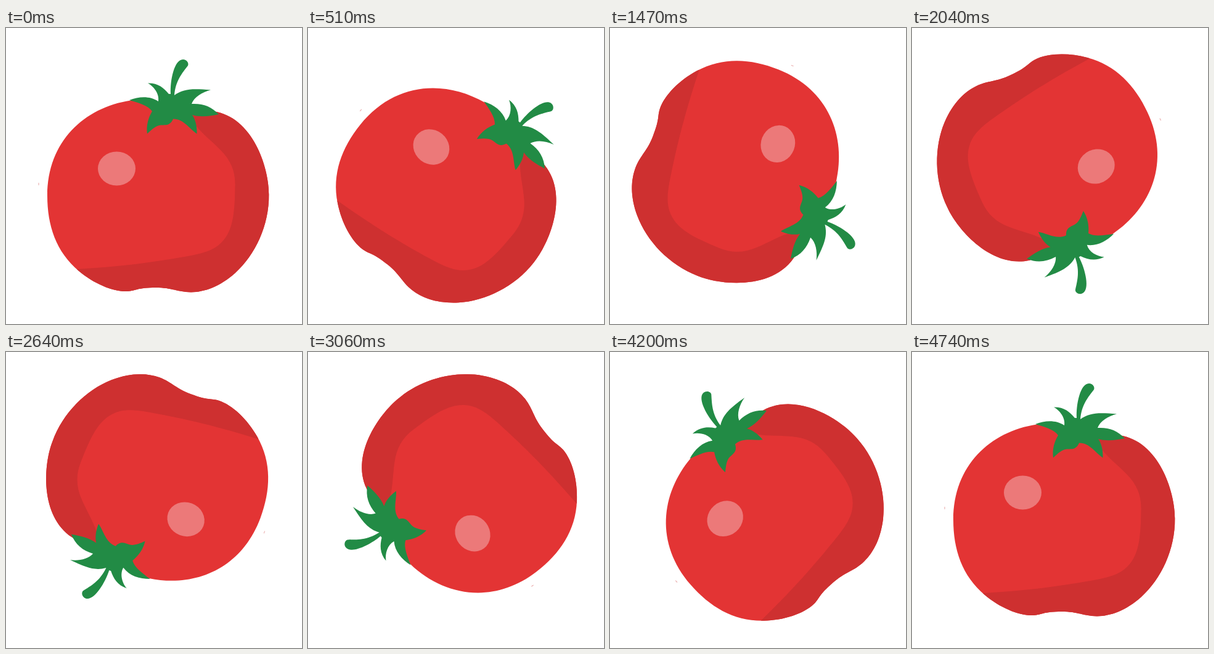
Animation of 480x480 px, one loop 4770 ms. Source, as an HTML page:

```html
<!DOCTYPE html>
<html lang="en">
<head>
<meta charset="utf-8">
<title>Rolling tomato</title>
<style>
  html, body { margin: 0; height: 100%; overflow: hidden; background: #fff; }
  svg { display: block; width: 100%; height: 100%; }
</style>
</head>
<body>
<svg viewBox="0 0 480 480">
  <defs>
    <path id="body" d="M202 117.5C127 129 67 184 67 272C67 320 81 363 118 394
      C143 415 174 428 197 427C211 426 212 421 243 421C270 421 277 428 300 428.5
      C322 428 346 420 372 397C404 368 427 320 426.3 270C427 232 404 150 342 136
      L320 133L225 118Z"/>
    <clipPath id="inside"><use href="#body"/></clipPath>
  </defs>
  <g id="tomato">
    <use href="#body" fill="#e33434"/>
    <path clip-path="url(#inside)" fill="#ce3030" d="M300 148C315 170 334 183 348 198
      C364 214 372 232 371.5 255C371 300 368 328 351 346C340 358 326 364 300 369
      C250 378 200 386 115 391V450H450V110H300Z"/>
    <ellipse cx="179.5" cy="228" rx="30.5" ry="27.5" fill="#ec7979"/>
    <path fill="#228b45" d="M267 107C266 84 273 51 287 51C293 51 297 57 295 61
      C286 73 275 85 273 109C288 98 303 98 332 100.5C318 104 305 112 301 123
      C319 122 333 127 345 140C331 143 315 145 302 141C307 148 310 159 309.5 171.5
      C298 164 288 147 271 147.5C266 159 259 157 251 157.5C243 158 236 165 229 171.5
      C227 158 231 145 237 135C230 125 213 121 200 117C216 111 233 110 247 119
      C249 107 240 95 230 89.5C246 89 256 97 264 107Z"/>
    <rect x="52.5" y="251" width="1" height="4" fill="#e8a5a5"/>
  </g>
</svg>
<script>
  const STEP = 30, STEPS = 159;
  const tomato = document.getElementById('tomato');

  function draw(now) {
    const step = Math.floor(now / STEP) % STEPS;
    // The last step completes the turn, so the upright pose is held twice.
    tomato.setAttribute('transform', `rotate(${360 * step / (STEPS - 1)} 239.5 239.5)`);
    requestAnimationFrame(draw);
  }
  requestAnimationFrame(draw);
</script>
</body>
</html>
```
